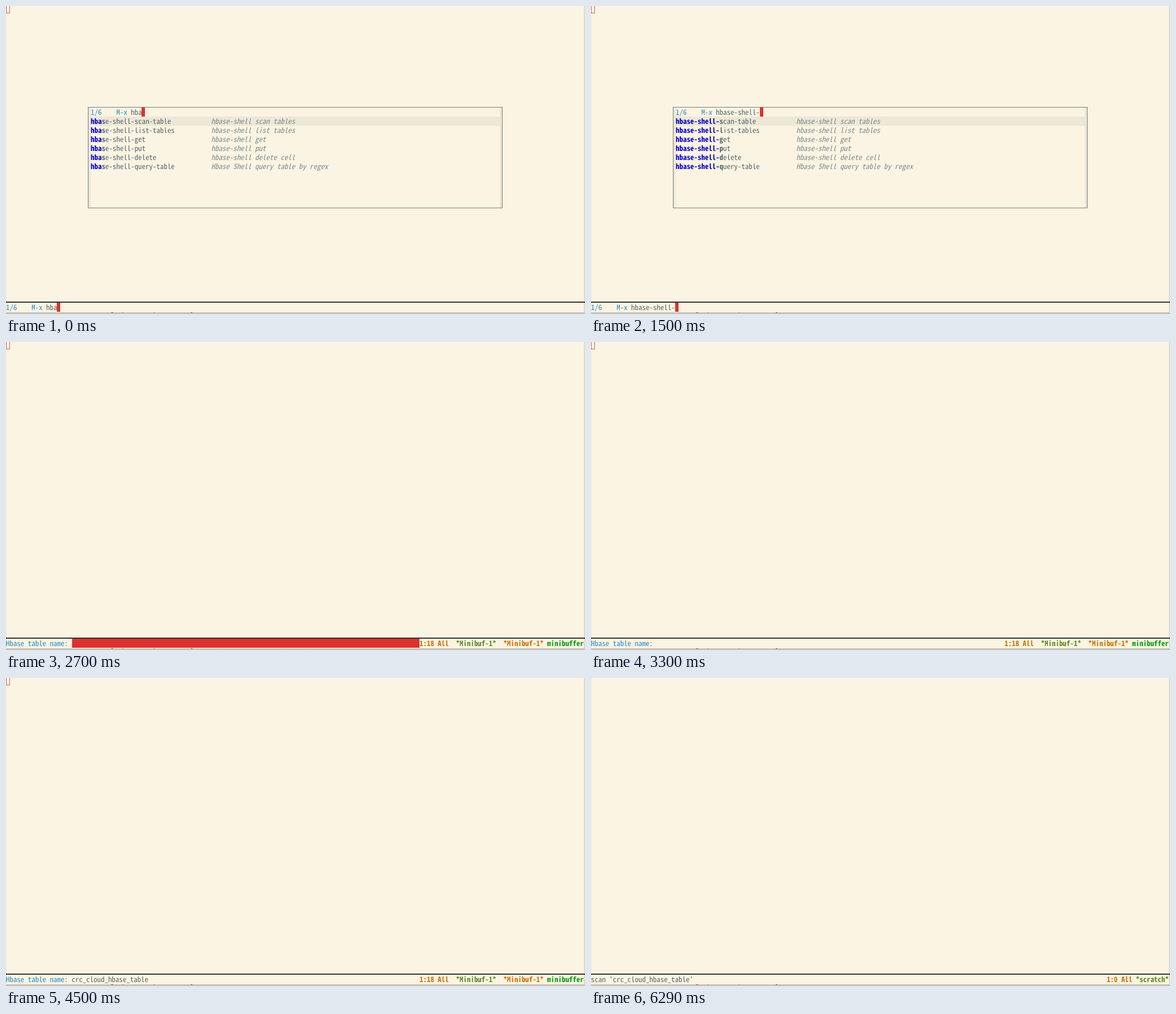
Recreate the animation shown at these times as an HTML page with a canvas. Size 1025x546 px, loop 8 s.

```html
<!DOCTYPE html>
<html lang="en">
<head>
<meta charset="utf-8">
<title>HBase shell in the minibuffer</title>
<style>
  html, body { margin: 0; width: 100%; height: 100%; overflow: hidden; background: #fcf4e2; }
  canvas { display: block; }
</style>
</head>
<body>
<canvas id="stage" width="1025" height="546"></canvas>
<script>
const ctx = document.getElementById('stage').getContext('2d');
const LOOP = 8000, CELL = 6.46, ROW = 16.15, MINI_Y = 526;
const FAMILY = '"Noto Sans Mono CJK SC", "Noto Sans Mono CJK JP", "Noto Sans Mono", monospace';
const C = {
  bg: '#fcf4e2', shade: '#ece7d6', text: '#536870', doc: '#7a8b8d', prompt: '#2388cc',
  match: '#0000c4', red: '#dc322f', orange: '#cb7000', green: '#558c20', mode: '#009c0c',
  border: '#747a78'
};

const COMMANDS = [
  ['hbase-shell-scan-table', 'hbase-shell scan tables'],
  ['hbase-shell-list-tables', 'hbase-shell list tables'],
  ['hbase-shell-get', 'hbase-shell get'],
  ['hbase-shell-put', 'hbase-shell put'],
  ['hbase-shell-delete', 'hbase-shell delete cell'],
  ['hbase-shell-query-table', 'Hbase Shell query table by regex']
];
const QUERY = 'hbase-shell-s', TABLE = 'crc_cloud_hbase_table';

// time, characters typed, point shown in the popup (it may lag behind)
const TYPING = [
  [0, 3, 3], [150, 4, 4], [300, 5, 4], [450, 5, 5], [600, 6, 6], [750, 7, 7],
  [900, 9, 8], [1050, 10, 10], [1200, 11, 11], [1500, 12, 12], [1650, 13, 13]
];

// pick the size whose advance equals one cell
ctx.font = `100px ${FAMILY}`;
const SIZE = CELL * 100 / ctx.measureText('0').width;
if ('textRendering' in ctx) ctx.textRendering = 'geometricPrecision';

function rect(x, y, w, h, color) {
  ctx.fillStyle = color;
  ctx.fillRect(x, y, w, h);
}

// draws text on the character grid and returns the x after it
function put(text, x, y, color, style = '') {
  ctx.font = `${style} ${SIZE}px ${FAMILY}`;
  ctx.fillStyle = color;
  for (const ch of text) {
    if (ch !== ' ') ctx.fillText(ch, x, y + 12.5);
    x += CELL;
  }
  return x;
}

function drawWindow() {
  rect(0, 0, 1025, 546, C.bg);
  rect(0, 0, 0.6, 542, '#e6e0d0');
  rect(1023, 0, 2, 543, '#e0dacb');
  rect(0, 524.2, 1025, 1.6, '#000');
  const edge = ctx.createLinearGradient(0, 542.5, 0, 546);
  edge.addColorStop(0, '#e6dfd0');
  edge.addColorStop(0.5, '#b9b6ae');
  edge.addColorStop(1, '#d0cdc6');
  rect(0, 543, 1025, 3, edge);
  for (const [x, w] of [[186, 4], [206, 1], [262, 1], [327, 3]]) rect(x, 543, w, 1, '#66655f');
}

function drawPrompt(x, y, typed, point, total, cursor) {
  put(`1/${total}`, x, y, C.prompt);
  put('M-x', x + 7 * CELL, y, C.prompt);
  const start = x + 11 * CELL, at = start + point * CELL;
  put(QUERY.slice(0, typed), start, y, C.text);
  if (!cursor) return;
  rect(Math.round(at), y, 6, 16, C.red);
  if (point < typed) put(QUERY[point], at, y, C.bg);
}

function drawPopup(typed, point, total) {
  rect(146, 180, 4, 178, C.shade);
  rect(874, 180, 4, 178, C.shade);
  ctx.strokeStyle = C.border;
  ctx.lineWidth = 1;
  ctx.strokeRect(145.5, 179.5, 733, 178.5);
  rect(150, 196, 724, 16.3, C.shade);
  drawPrompt(150, 180, typed, point, total, true);
  COMMANDS.slice(0, total).forEach(([name, doc], i) => {
    const y = 180 + ROW * (i + 1), next = total > 1 ? point + 1 : point;
    let x = put(name.slice(0, point), 150, y, C.match, 'bold');
    x = put(name.slice(point, next), x, y, C.text, 'bold');
    put(name.slice(next), x, y, C.text);
    put(doc, 150 + 33 * CELL, y, C.doc, 'italic');
  });
}

function drawSearch(t) {
  const [, typed, point] = TYPING.filter(step => step[0] <= t).pop();
  const total = typed === QUERY.length ? 1 : COMMANDS.length;
  drawPopup(typed, point, total);
  drawPrompt(0, MINI_Y, typed, typed, total, t < 2100);
}

// right-aligned bold status parts
function drawStatus(parts) {
  const cells = parts.reduce((n, [text]) => n + text.length, 0);
  let x = 1022.7 - cells * CELL;
  for (const [text, color] of parts) x = put(text, x, MINI_Y, color, 'bold');
}

function drawTablePrompt(t) {
  const pasted = t >= 4050;
  const bar = t < 3300 || (t >= 3750 && t < 4500);
  const x = put('Hbase table name: ', 0, MINI_Y, C.prompt);
  const end = pasted ? put(TABLE, x, MINI_Y, C.text) : x;
  if (bar) {
    const left = Math.round(end + 0.3);
    rect(left, MINI_Y, 732 - left, 16, C.red);
  }
  drawStatus([['1:18 All  ', C.orange], ['*Minibuf-1*  ', C.green],
    ['*Minibuf-1* ', C.orange], ['minibuffer', C.mode]]);
}

function drawScratch(t) {
  put(`scan '${TABLE}'`, 0, MINI_Y, C.text);
  drawStatus([['1:0 All ', C.orange], ['*scratch*', C.green]]);
  if (t < 5390 || (t >= 5840 && t < 6290)) rect(0, 0, 7, 13, C.red);
}

function draw(t) {
  drawWindow();
  if (t >= 4800) return drawScratch(t);
  ctx.strokeStyle = '#e0605a';
  ctx.lineWidth = 1;
  ctx.strokeRect(0.5, -0.5, 6, 13);
  if (t < 2700) drawSearch(t);
  else drawTablePrompt(t);
}

const begin = performance.now();
function tick() {
  draw((performance.now() - begin) % LOOP);
  requestAnimationFrame(tick);
}
tick();
</script>
</body>
</html>
```
